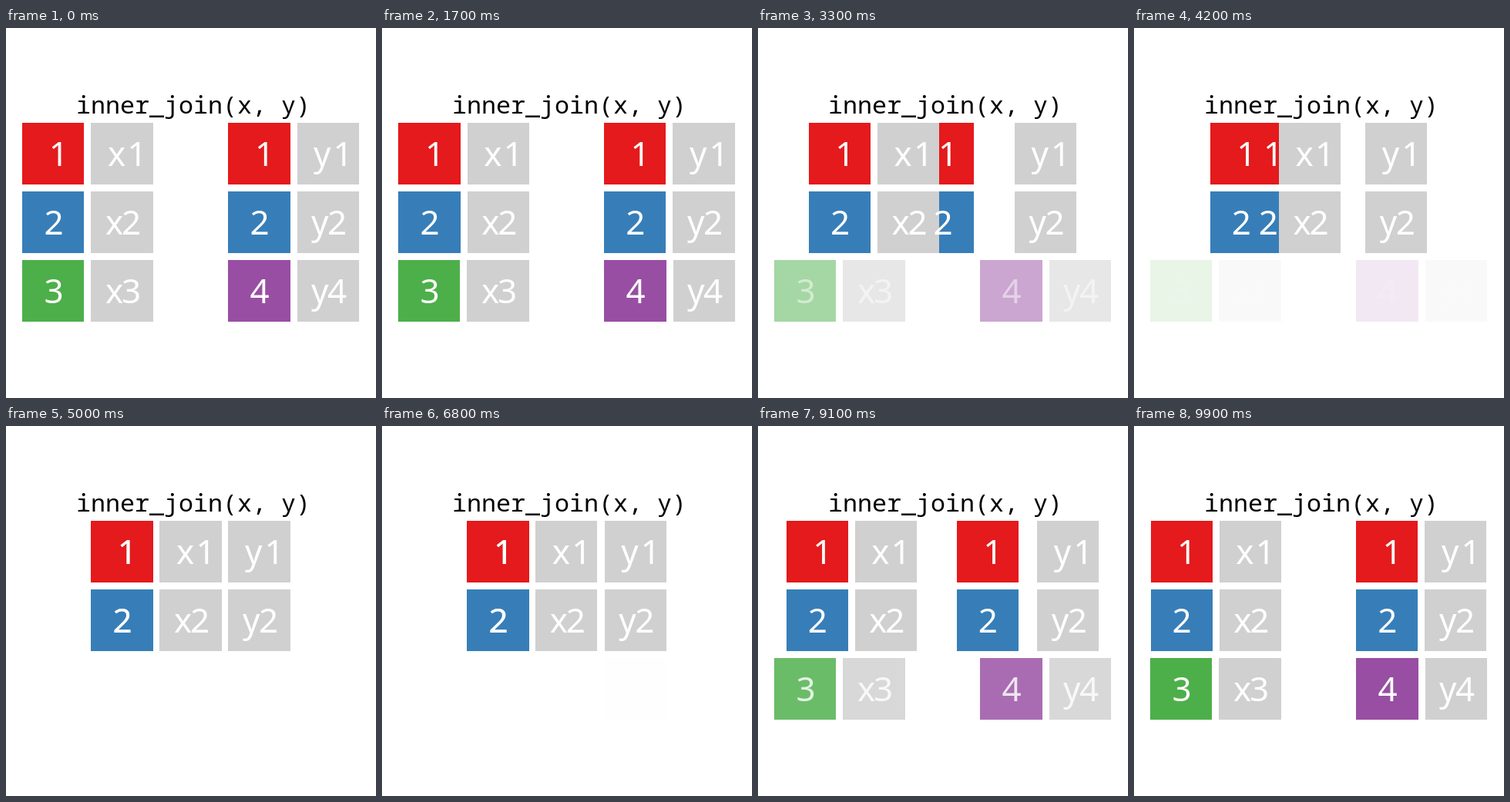
These frames come from a looping animation (480x480 px, 10000 ms). An HTML page:

```html
<!DOCTYPE html>
<html lang="en">
<head>
<meta charset="utf-8">
<title>Inner join</title>
<style>
  html, body { margin: 0; width: 100%; height: 100%; overflow: hidden; background: #fff; }
  svg { display: block; width: 100%; height: 100%; }
  .title { font: 31.67px "Noto Sans Mono", "DejaVu Sans Mono", monospace; }
  .label { font: 44px "Noto Sans", "Open Sans", sans-serif; fill: #fff; }
</style>
</head>
<body>
<svg viewBox="0 0 480 480">
  <text class="title" x="91" y="111" xml:space="preserve">inner_join(x, y)</text>
  <g id="tiles" shape-rendering="crispEdges"></g>
  <g id="labels"></g>
</svg>
<script>
const PITCH = 89.06, SIZE = PITCH * 0.9, MID = 239.5;
const LOOP = 10000, STEP = 100;
const GREY = '#d0d0d0';
const KEY_COLORS = { 1: '#e41a1c', 2: '#377eb8', 3: '#4daf4a', 4: '#984ea3' };

// Columns run from -2 to 2 around the middle; later sets are painted on top.
const sets = [
  { name: '', ids: [1, 2, 3], from: -2, to: -1 },
  { name: '', ids: [1, 2, 4], from: 1, to: -1 },
  { name: 'x', ids: [1, 2, 3], from: -1, to: 0 },
  { name: 'y', ids: [1, 2, 4], from: 2, to: 1 }
];

function add(parent, tag, attrs) {
  const el = document.createElementNS('http://www.w3.org/2000/svg', tag);
  for (const k in attrs) el.setAttribute(k, attrs[k]);
  return document.getElementById(parent).appendChild(el);
}

// Glyph starts relative to the tile centre; the digit 1 sits further right.
function glyphStarts(name, id) {
  if (!name) return id === 1 ? '-5.6' : '-12';
  return id === 1 ? '-18.5 7' : '-21.5 -0.5';
}

const cells = sets.flatMap(({ name, ids, from, to }) => ids.map((id, row) => {
  const rect = add('tiles', 'rect', {
    y: 123 + 89 * row, height: 80, fill: name ? GREY : KEY_COLORS[id]
  });
  const text = add('labels', 'text', {
    class: 'label', x: glyphStarts(name, id), y: 179.3 + 89 * row
  });
  text.textContent = name + id;
  return { rect, text, from, to, fades: id > 2 };
}));

const ease = p => (1 - Math.cos(Math.PI * p)) / 2;

// 0 = separate tables, 1 = joined table
function joined(t) {
  const n = Math.floor(t / STEP);
  if (n <= 16) return 0;
  if (n < 50) return ease((n - 16) / 34);
  if (n <= 67) return 1;
  return 1 - ease((n - 67) / 33);
}

function draw(t) {
  const s = joined(t);
  for (const { rect, text, from, to, fades } of cells) {
    const col = fades ? from : from + (to - from) * s;
    const cx = MID + col * PITCH;
    const left = Math.round(cx - SIZE / 2);
    rect.setAttribute('x', left);
    rect.setAttribute('width', Math.round(cx + SIZE / 2) - left);
    text.setAttribute('transform', `translate(${cx.toFixed(2)} 0)`);
    if (fades) {
      rect.setAttribute('opacity', 1 - s);
      text.setAttribute('opacity', 1 - s);
    }
  }
}

const start = performance.now();
function tick() {
  draw((performance.now() - start) % LOOP);
  requestAnimationFrame(tick);
}
tick();
</script>
</body>
</html>
```
